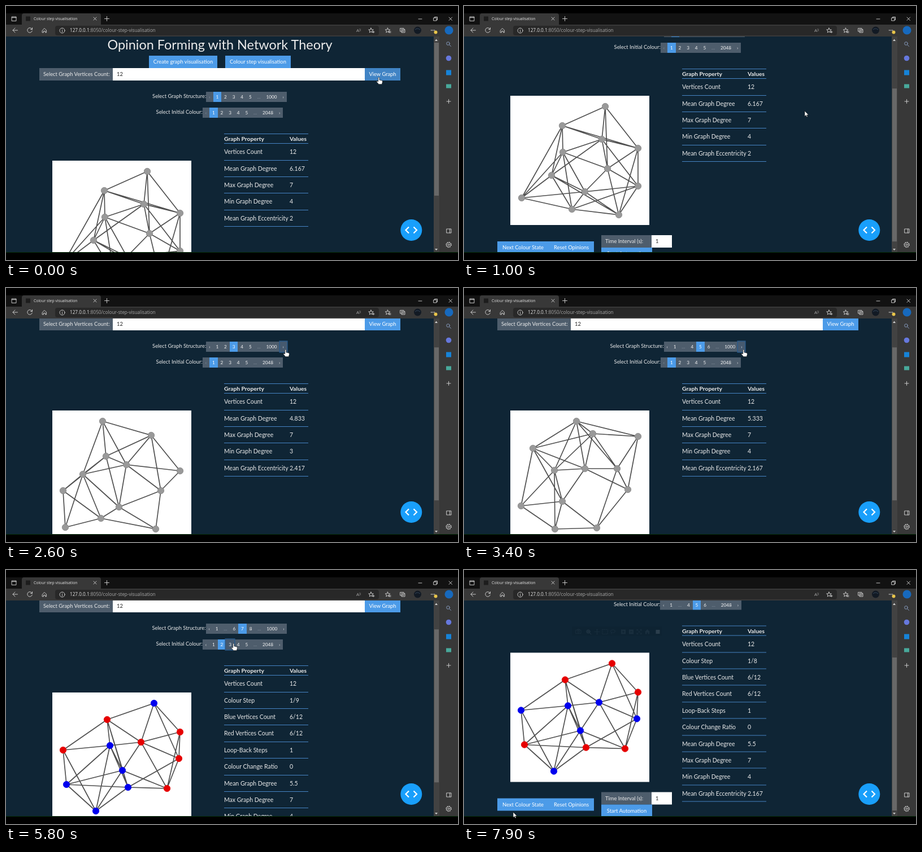
An HTML page that plays this animation: 800x450 px, repeating every 8 s.

```html
<!DOCTYPE html>
<html lang="en">
<head>
<meta charset="utf-8">
<title>Colour step visualisation</title>
<style>
html, body { margin: 0; width: 100%; height: 100%; overflow: hidden; background: #000; }
* { box-sizing: border-box; }
#stage { position: relative; width: 800px; height: 450px; overflow: hidden; background: #000; }
#chrome, #overlay { position: absolute; left: 0; top: 0; }
#chrome text { font-family: "Open Sans", "Noto Sans", sans-serif; fill: #e4e4e4; }
.line { fill: none; stroke: #d6d6d6; stroke-width: .9; stroke-linecap: round; stroke-linejoin: round; }
#view { position: absolute; left: 0; top: 54px; width: 757px; height: 382px; overflow: hidden; background: #0f2535; }
#page { position: absolute; left: 0; top: -54px; width: 757px; height: 600px; color: #ebebeb; font: 9.35px/22px Lato, sans-serif; white-space: nowrap; }
#page > * { position: absolute; }
h1 { left: 0; top: 53px; width: 757px; margin: 0; text-align: center; font: 400 23.45px/31px Lato, sans-serif; }
.btn, .tag, .field { height: 22px; }
.btn { background: #4c9be8; text-align: center; color: #fff; }
.btn.over { background: #4184c5; }
.tag { background: #4e5d6c; padding-left: 7px; }
.field { background: #fff; color: #222; padding-left: 7px; }
.pick { left: -.6px; width: 757px; height: 18px; display: flex; justify-content: center; line-height: 15px; }
.pick i { font: 8.2px/18px Lato, sans-serif; height: 18px; padding: 0 4.95px; background: #4e5d6c; color: #f4f4f4; }
.pick i.off { color: #8e99a4; }
.pick i.on { background: #4c9be8; color: #fff; }
.pick i.focus { position: relative; background: #465a70; box-shadow: 0 0 0 1.6px #2c5a88; }
#table { left: 386px; top: 226.4px; width: 149px; font-size: 10.5px; }
#table div { display: flex; height: 29.4px; line-height: 29px; border-bottom: 1px solid #4684c4; }
#table div:first-child { height: 17.8px; line-height: 17px; border-top: 1px solid #4684c4; font-weight: 700; font-size: 10.3px; }
#table span { width: 116px; flex: none; }
#plot { left: 82px; top: 274px; background: #fff; }
#plot path { fill: none; stroke: #505050; stroke-width: 1.7; }
#tools { left: 191px; top: 228px; background: #0b1823; }
#tools .line { stroke: #526270; }
</style>
</head>
<body>
<div id="stage">
<svg id="chrome" width="800" height="450">
  <path d="M0 13H800V33H0Z" fill="#121212"/>
  <path d="M0 33H800V436H0Z" fill="#383838"/>
  <path d="M28 33V17Q28 13 32 13H164Q168 13 168 17V33Z" fill="#383838"/>
  <rect x="87" y="35" width="573" height="17" rx="4" fill="#282828"/>
  <rect x="35" y="18.5" width="8" height="8" fill="#1d1d1d"/>
  <text x="49" y="25" font-size="6.8">Colour step visualisation</text>
  <text x="113" y="46" font-size="8.2"><tspan>127.0.0.1</tspan><tspan fill="#a9a9a9">:8050/colour-step-visualisation</tspan></text>
  <text x="620" y="46" font-size="8" style="fill:#aaa">A<tspan font-size="5" dy="-2">))</tspan></text>
  <g class="line">
    <path d="M10.5 19H18V26.5H10.5ZM10.5 20.5H18M155 20L160 25M160 20L155 25M174.5 22.5H182.5M178.5 18.5V26.5"/>
    <path d="M730 23H736M757 21H762V26H757ZM758.5 21V19.5H763.5V24.5H762M784 20L789.5 25.5M789.5 20L784 25.5"/>
    <path d="M20.5 43H12M16 39L12 43L16 47M46 41A4.3 4.3 0 1 0 46.3 44M46.5 38.5V41.5H43.5"/>
    <path d="M64.5 43L68 39.5L71.5 43V47H69.5V44.5H66.5V47H64.5Z"/>
    <circle cx="99.5" cy="43.5" r="4.5"/><path d="M99.5 43V46M99.5 41V41.2"/>
    <path id="star" d="M646 39L647.2 41.8L650.3 42L648 44L648.7 47L646 45.4L643.3 47L644 44L641.7 42L644.8 41.8Z"/>
    <use href="#star" x="29.5"/><path d="M677 45H681M678 47H681M649 46H652M650.5 44.5V47.5"/>
    <path d="M698 39.5H704V45H698ZM700 45V47H706V41.5H704M701 40.8V43.8M699.5 42.3H702.5"/>
    <g stroke="#8fa6ce"><circle cx="782.5" cy="66.5" r="2.8"/><path d="M784.7 68.7L787.5 71.5"/></g>
    <path d="M780 169H787M783.5 165.5V172.5M780 395H788V402H780ZM785.5 395V402"/>
    <circle cx="783.5" cy="423" r="4"/><circle cx="783.5" cy="423" r="1.5"/>
    <circle cx="783.5" cy="423" r="4.8" stroke-dasharray="1.8 1.97" stroke-linecap="butt"/>
  </g>
  <circle cx="728.5" cy="43" r="6.5" fill="#121a24"/>
  <path d="M724 42Q728 38 733 42" stroke="#34465a" fill="none"/>
  <path d="M752 43H759" stroke="#d6d6d6" stroke-width="1.5" stroke-dasharray="1.5 1.3"/>
  <circle cx="760.5" cy="46.5" r="3" fill="#e9c54a"/>
  <circle cx="784" cy="43" r="7.5" fill="#1769bd"/>
  <circle cx="783.5" cy="92.5" r="4.8" fill="#6678dd"/>
  <rect x="779" y="113.5" width="9" height="9" fill="#1683d8"/>
  <rect x="779" y="138.5" width="9" height="7" fill="#48a99b"/>
  <rect x="757" y="54" width="10" height="382" fill="#424242"/>
  <rect id="thumb" x="758" y="65" width="8" height="271" fill="#686868"/>
  <path d="M759 62L761.5 58.5L764 62ZM759 430L761.5 433L764 430Z" fill="#ccc"/>
  <path d="M0 436.5H800" stroke="#062d0a"/>
</svg>
<div id="view">
  <div id="page">
    <h1>Opinion Forming with Network Theory</h1>
    <div class="btn" style="left:253px;top:88px;width:121px">Create graph visualisation</div>
    <div class="btn" style="left:388px;top:88px;width:116px">Colour step visualisation</div>
    <div class="tag" style="left:59px;top:110px;width:130px">Select Graph Vertices Count:</div>
    <div class="field" style="left:189px;top:110px;width:446px">12</div>
    <div class="btn" id="viewBtn" style="left:635px;top:110px;width:63px">View Graph</div>
    <div class="pick" id="structure" style="top:152px"></div>
    <div class="pick" id="colour" style="top:180px"></div>
    <div id="table"></div>
    <svg id="plot" width="246" height="229"></svg>
    <svg id="tools" width="159" height="16">
      <g class="line">
        <path d="M7 6H16V12H7ZM9.5 6V4.5H13.5V6"/><circle cx="11.5" cy="9" r="1.7"/>
        <g style="stroke:#a9b3bb"><circle cx="29" cy="8.5" r="3"/><path d="M31.5 11L34 13.5M27.5 8.5H30.5M29 7V10"/></g>
        <path d="M40 9H49M44.5 4.5V13.5M43.5 5.5L44.5 4.5L45.5 5.5M43.5 12.5L44.5 13.5L45.5 12.5"/>
        <path d="M54 5H63V13H54Z" stroke-dasharray="1.5 1.5"/>
        <ellipse cx="72.5" cy="8" rx="4" ry="2.7"/><path d="M69.5 10L70 13"/>
        <path d="M115 5L123 13M123 5L115 13M115 7V5H117M121 5H123V7M115 11V13H117M121 13H123V11"/>
      </g>
      <path d="M87 5H95V13H87ZM101 5H109V13H101ZM129 9L133.5 4.5L138 9H137V13H134.5V10H132.5V13H130V9Z" fill="#526270"/>
      <path d="M89 9H93M91 7V11M103 9H107" stroke="#0b1823"/>
      <rect x="148.5" y="5.5" width="7" height="7" fill="#c9ced2"/>
    </svg>
    <div class="btn" style="left:59px;top:531.5px;width:91px">Next Colour State</div>
    <div class="btn" style="left:150px;top:531.5px;width:80px">Reset Opinions</div>
    <div class="tag" style="left:243px;top:520.5px;width:89px">Time Interval (s):</div>
    <div class="field" style="left:332px;top:520.5px;width:36px">1</div>
    <div class="btn" style="left:243px;top:542.5px;width:90px">Start Automation</div>
  </div>
</div>
<svg id="overlay" width="800" height="450">
  <circle cx="717.3" cy="397" r="19" fill="#199ffb"/>
  <path d="M713 391.5L707.5 397L713 402.5M721.5 391.5L727 397L721.5 402.5" fill="none" stroke="#fff" stroke-width="2.2"/>
  <g id="cursor" fill="#fff" stroke="#111" stroke-width=".6">
    <path id="arrow" d="M0 0V9.5L2.2 7.4L3.7 10.8L5.2 10.1L3.7 6.9H6.8Z"/>
    <path id="hand" transform="translate(.8) scale(1.1)" d="M-1 1Q0-1 1 1V4.5L5 5.5Q6.5 6 6 8L5 11.5H0L-3.5 7.5Q-3.5 5.5-1 7Z"/>
  </g>
</svg>
</div>
<script>
const LOOP = 8000, FRAME = 100, TRAVEL = 450, DWELL = 150;
const el = id => document.getElementById(id);

// Vertex positions; the links follow from the link count and degree limits.
const graphs = {
  1: { links: 37, max: 7, min: 4, eccentricity: 2,
    points: '168,19 92,53 162,77 226,93 93,100 172,129 73,141 226,160 132,170 20,181 109,201 192,211' },
  3: { links: 29, max: 7, min: 3, eccentricity: 2.417,
    points: '89,19 175,44 95,81 131,96 226,107 54,113 19,142 192,142 118,171 86,191 23,207 183,210' },
  5: { links: 32, max: 7, min: 4, eccentricity: 2.167,
    points: '117,19 146,41 226,46 40,67 132,103 189,103 78,106 208,140 92,161 19,169 153,208 79,210' },
  7: { links: 33, max: 7, min: 4, eccentricity: 2.167,
    points: '180,19 97,48 226,70 157,88 102,94 19,102 224,117 124,138 25,163 134,168 203,170 77,210' }
};

// Join the closest pairs first: up to the least degree, then up to the link count.
function link(graph) {
  const points = graph.points.split(' ').map(p => p.split(',').map(Number));
  const degree = points.map(() => 0), edges = [], pairs = [];
  points.forEach((p, a) => points.slice(0, a).forEach((q, b) =>
    pairs.push({ a, b, length: Math.hypot(p[0] - q[0], p[1] - q[1]) })));
  pairs.sort((p, q) => p.length - q.length);
  for (const floor of [graph.min, graph.max]) {
    for (const pair of pairs) {
      const { a, b } = pair, low = Math.min(degree[a], degree[b]), high = Math.max(degree[a], degree[b]);
      if (edges.length === graph.links || edges.includes(pair) || low >= floor || high >= graph.max) continue;
      edges.push(pair);
      degree[a]++;
      degree[b]++;
    }
  }
  return { ...graph, points, edges };
}
for (const id in graphs) graphs[id] = link(graphs[id]);

// Where the pointer is at a time, what it aims at and which page it picks.
const moves = [
  { at: 0, x: 659, y: 126, aim: 'view', structure: 1, colour: 1 },
  { at: 700, x: 603, y: 186 },
  { at: 1800, x: 398, y: 106, structure: 3 },
  { at: 2700, x: 494, y: 109, aim: '›', structure: 4 },
  { at: 3200, x: 494, y: 109, aim: '›', structure: 5 },
  { at: 4000, x: 494, y: 109, aim: '›', structure: 6 },
  { at: 4500, x: 494, y: 109, aim: '›', structure: 7 },
  { at: 5300, x: 383, y: 130, aim: 2, colour: 2 },
  { at: 5900, x: 402, y: 130, aim: 3, colour: 3 },
  { at: 6300, x: 412, y: 130, aim: 4, colour: 4 },
  { at: 6700, x: 427, y: 130, aim: 5, colour: 5 },
  { at: 7300, x: 366, y: 189 },
  { at: 7900, x: 87, y: 429 }
];

function ramp(t, from, to) {
  const u = Math.min(1, Math.max(0, (t - from) / (to - from)));
  return u * u * (3 - 2 * u);
}

function pager(label, current, last, focus) {
  const middle = current < 4 ? [1, 2, 3, 4, 5] : [1, '…', current - 1, current, current + 1];
  const items = ['‹', ...middle, '…', last, '›'].map(v => {
    const off = v === '…' || (v === '‹' && current === 1);
    const cls = v === current ? 'on' : v === focus ? 'focus' : off ? 'off' : '';
    return `<i class="${cls}">${v}</i>`;
  });
  return `${label}:${items.join('')}`;
}

function table(graph, colour) {
  const coloured = [['Colour Step', colour < 4 ? '1/9' : '1/8'], ['Blue Vertices Count', '6/12'],
    ['Red Vertices Count', '6/12'], ['Loop-Back Steps', 1], ['Colour Change Ratio', 0]];
  const count = graph.points.length, mean = +(2 * graph.links / count).toFixed(3);
  const rows = [['Graph Property', 'Values'], ['Vertices Count', count], ...(colour > 1 ? coloured : []),
    ['Mean Graph Degree', mean], ['Max Graph Degree', graph.max], ['Min Graph Degree', graph.min],
    ['Mean Graph Eccentricity', graph.eccentricity]];
  return rows.map(([name, value]) => `<div><span>${name}</span>${value}</div>`).join('');
}

function plot({ points, edges }, colour) {
  const red = colour < 4 ? '12356a' : '01289a';
  const lines = edges.map(({ a, b }) => `M${points[a]}L${points[b]}`);
  const nodes = points.map(([x, y], i) => {
    const fill = colour === 1 ? '#999' : red.includes(i.toString(16)) ? '#e60000' : '#0000ee';
    const rim = colour === 1 ? '#858585' : fill;
    return `<circle cx="${x}" cy="${y}" r="5.7" fill="${fill}" stroke="${rim}" stroke-width=".8"/>`;
  });
  return `<path d="${lines.join('')}"/>${nodes.join('')}`;
}

let shown = '';

function render(t) {
  const past = moves.filter(m => m.at <= t);
  const { structure, colour } = Object.assign({}, ...past);
  const last = past[past.length - 1], next = moves[past.length] || last;
  const arrive = next.at - DWELL;
  const go = ramp(t, Math.max(last.at, arrive - TRAVEL), arrive);
  const over = go === 1 ? next : last;
  const hand = over.aim && (go === 0 || next.aim);
  const focusA = over.structure && over.aim, focusB = over.colour && over.aim;

  const key = [structure, colour, focusA, focusB].join();
  if (key !== shown) {
    shown = key;
    // Only odd structures have been drawn; the plot lags behind on even ones.
    const graph = graphs[structure - 1 + structure % 2];
    el('structure').innerHTML = pager('Select Graph Structure', structure, 1000, focusA);
    el('colour').innerHTML = pager('Select Initial Colour', colour, 2048, focusB);
    el('table').innerHTML = table(graph, colour);
    el('plot').innerHTML = plot(graph, colour);
  }

  const scroll = 115 * ramp(t, 100, 600) - 58 * ramp(t, 1000, 1300) + 70.5 * ramp(t, 7350, 7800);
  el('page').style.transform = `translateY(${-scroll}px)`;
  el('thumb').setAttribute('y', 65 + scroll * .706);
  el('tools').style.opacity = ramp(t, 6950, 7200) - ramp(t, 7650, 7980);
  el('viewBtn').classList.toggle('over', hand === 'view' || t < 200);
  el('hand').style.display = hand ? '' : 'none';
  el('arrow').style.display = hand ? 'none' : '';
  const x = last.x + (next.x - last.x) * go, y = last.y + (next.y - last.y) * go;
  el('cursor').setAttribute('transform', `translate(${x} ${y})`);
}

const start = performance.now();
function tick() {
  const t = (performance.now() - start) % LOOP;
  render(Math.floor(t / FRAME) * FRAME);
  requestAnimationFrame(tick);
}
tick();
</script>
</body>
</html>
```
